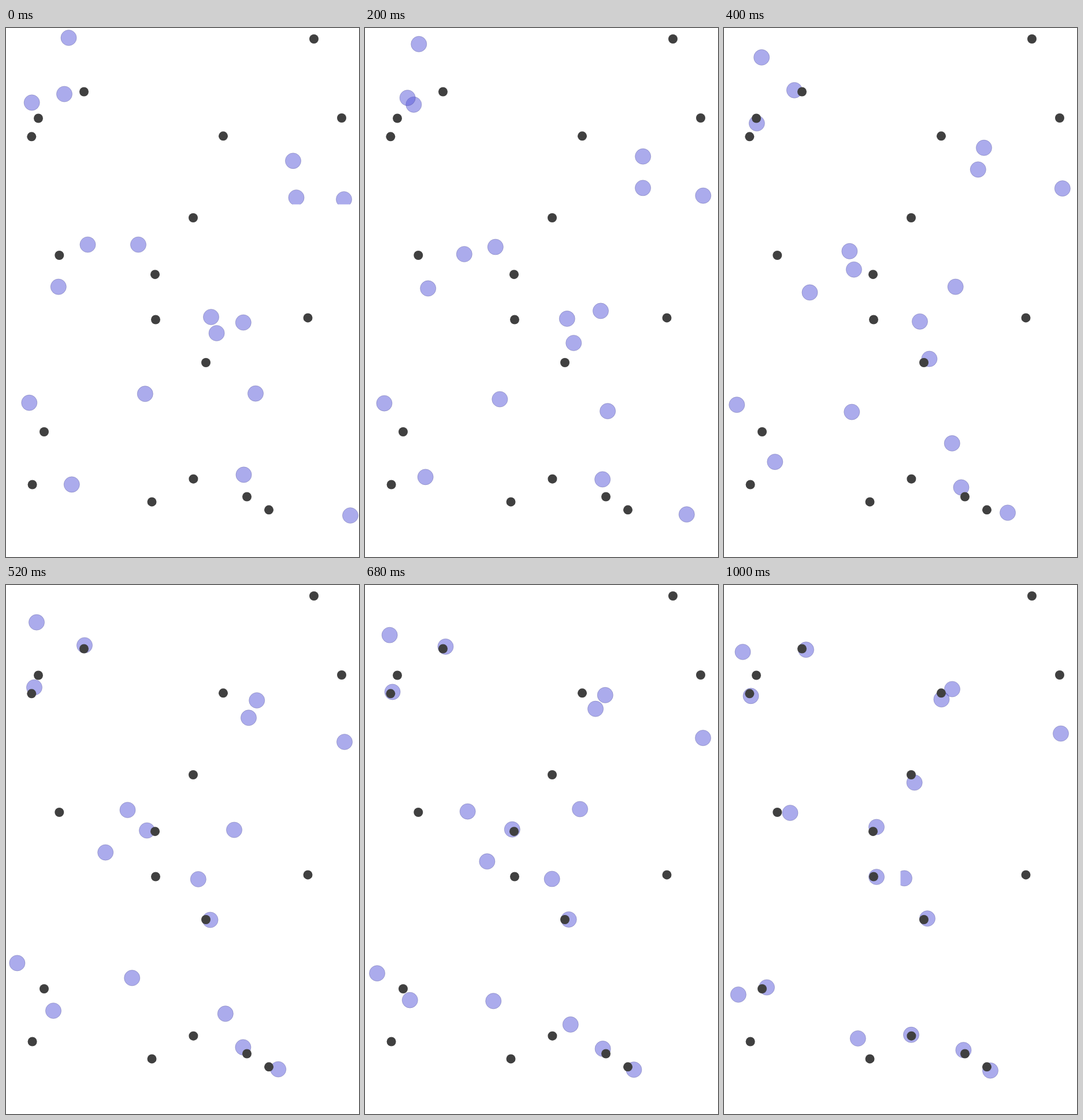
Write an HTML page with a canvas that moves like this. It is 611x917 px and loops after 1040 ms.

```html
<!DOCTYPE html>
<html>
<head>
<meta charset="utf-8">
<style>
  html, body { margin: 0; height: 100%; overflow: hidden; background: #fff; }
  canvas { display: block; }
</style>
</head>
<body>
<canvas id="stage" width="611" height="917"></canvas>
<script>
const W = 611, H = 917, LOOP = 1040, STEP = 40;
const MID = 520, END = 960;
const ctx = document.getElementById('stage').getContext('2d');

// Each cell clips its own balls; a ball has a start, a midway and a resting point.
const cells = [
  {
    col: 0, row: 0,
    pins: [[135, 110.5], [56, 156.5], [44.3, 188.3]],
    balls: [
      [[108.5, 17], [53, 64.7], [32.5, 116]],
      [[101, 114.5], [49, 177.5], [46.5, 192.3]],
      [[44.7, 129.3], [136, 104.5], [142, 112.2]]
    ]
  },
  {
    col: 1, row: 0,
    pins: [[533, 19], [376, 187.3], [581, 156]],
    balls: [
      [[497, 230.3], [434.2, 200], [395, 180.5]],
      [[502.5, 294], [420, 230.2], [376.5, 198.2]],
      [[585, 297], [586, 272], [583, 257.5]]
    ]
  },
  {
    col: 0, row: 1,
    pins: [[92.3, 394], [258, 427.2], [259, 505.5]],
    balls: [
      [[141.5, 375.5], [244, 425.5], [264, 419.5]],
      [[229, 375.5], [210.5, 390], [114.5, 395]],
      [[90.8, 448.6], [172.2, 463.6], [264, 506]]
    ]
  },
  {
    col: 1, row: 1,
    pins: [[324, 329], [522.5, 502.4], [346, 580]],
    balls: [
      [[355, 501], [332.8, 510], [312, 508.4]],
      [[410.8, 510.5], [395, 424.5], [329.7, 342.5]],
      [[364.6, 529], [353.5, 580.5], [352, 578.2]]
    ]
  },
  {
    col: 0, row: 2,
    pins: [[66, 700], [45.6, 791.5], [252.5, 821.4]],
    balls: [
      [[40.3, 649.6], [19.4, 655.4], [24.8, 710]],
      [[240.8, 634.2], [218.2, 681.2], [231.8, 786]],
      [[113.8, 791.3], [82, 738], [74, 697.5]]
    ]
  },
  {
    col: 1, row: 2,
    pins: [[324.4, 781.7], [417, 812.5], [455, 835.3]],
    balls: [
      [[432, 633.6], [379.8, 743.2], [324, 779.7]],
      [[411.5, 774.4], [410.4, 801.3], [414.5, 806.2]],
      [[596, 845], [471.2, 839.5], [461, 841.7]]
    ]
  }
];

const smooth = u => u * u * (3 - 2 * u);
const mix = (a, b, u) => a + (b - a) * u;

// From rest to rest through b, with no overshoot there.
function glide(a, b, c, t) {
  const before = (b - a) / MID, after = (c - b) / (END - MID);
  const speed = before * after > 0 ? 2 * before * after / (before + after) : 0;
  if (t < MID) {
    const u = t / MID;
    return mix(a, b, smooth(u)) - MID * speed * u * u * (1 - u);
  }
  const span = END - MID, u = Math.min((t - MID) / span, 1);
  return mix(b, c, smooth(u)) + span * speed * u * (1 - u) ** 2;
}

function disc(x, y, r) {
  ctx.beginPath();
  ctx.arc(x, y, r, 0, 2 * Math.PI);
  ctx.fill();
}

function drawCell({ col, row, pins, balls }, t) {
  ctx.save();
  ctx.beginPath();
  ctx.rect(col * W / 2, row * H / 3, W / 2, H / 3);
  ctx.clip();
  ctx.fillStyle = 'rgba(89, 89, 217, .5)';
  ctx.strokeStyle = 'rgba(60, 60, 120, .35)';
  ctx.lineWidth = 0.8;
  for (const [from, via, to] of balls) {
    disc(glide(from[0], via[0], to[0], t), glide(from[1], via[1], to[1], t), 13.6);
    ctx.stroke();
  }
  ctx.fillStyle = '#404040';
  for (const [x, y] of pins) disc(x, y, 8);
  ctx.restore();
}

const start = performance.now();
function tick() {
  const t = Math.floor((performance.now() - start) % LOOP / STEP) * STEP;
  ctx.clearRect(0, 0, W, H);
  for (const cell of cells) drawCell(cell, t);
  requestAnimationFrame(tick);
}
tick();
</script>
</body>
</html>
```
